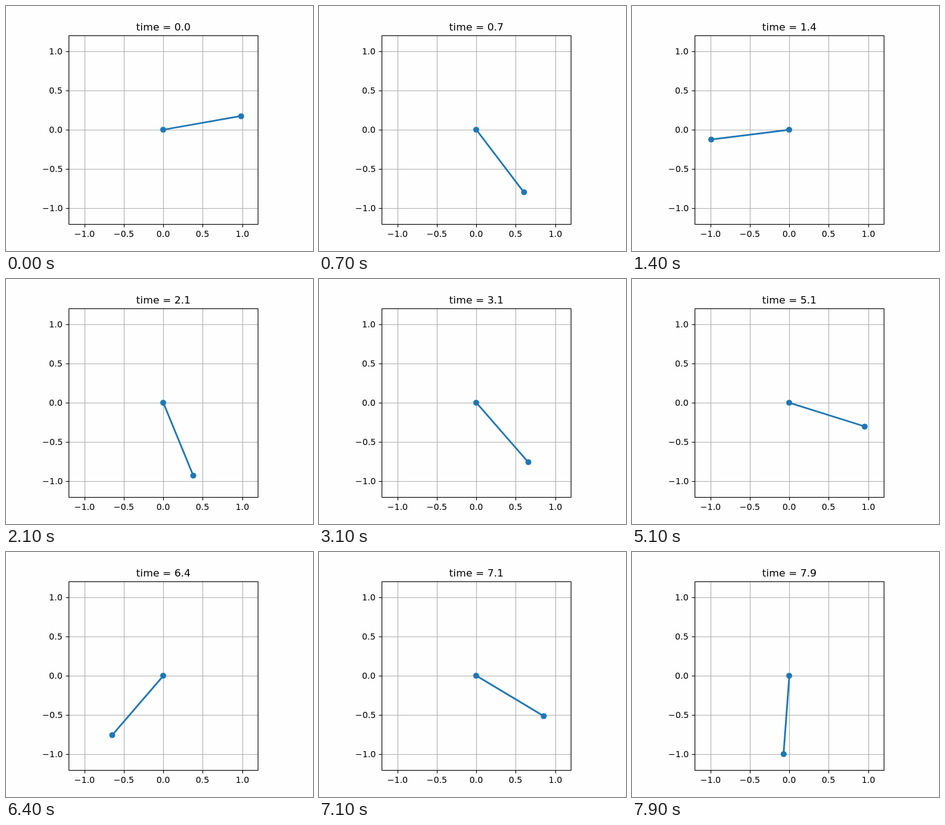
These frames come from a looping animation (500x400 px, 8000 ms). An HTML page with a canvas:

```html
<!DOCTYPE html>
<html lang="en">
<head>
<meta charset="utf-8">
<title>Pendulum</title>
<style>
  html, body { margin: 0; width: 100%; height: 100%; overflow: hidden; background: #fefefe; }
  canvas { display: block; width: 500px; height: 400px; }
</style>
</head>
<body>
<canvas id="stage" width="500" height="400"></canvas>
<script>
const ctx = document.getElementById('stage').getContext('2d');
const LOOP = 8000, STEP = 100;
const CX = 256.25, CY = 202, SCALE = 308 / 2.4;
const LEFT = 102.5, RIGHT = 410.5, TOP = 48.5, BOTTOM = 356.5;
const PT = 100 / 72;
const BLUE = '#1f77b4';
const TICKS = [-1, -0.5, 0, 0.5, 1];

// Turning points of the swing: [seconds, degrees from straight down]
const TURNS = [
  [0.152, 105.2], [1.425, -83], [2.644, 90], [3.812, -68.5],
  [4.978, 75.7], [6.133, -56.9], [7.247, 63.7], [8.378, -46.7]
];

// Large-amplitude swing: a cosine flattened at the ends, leaning to the right
function angleAt(t) {
  let i = 0;
  while (i < TURNS.length - 2 && t >= TURNS[i + 1][0]) i++;
  const [t0, a] = TURNS[i], [t1, b] = TURNS[i + 1];
  const phase = Math.PI * (t - t0) / (t1 - t0);
  const mid = (a + b) / 2, half = (a - b) / 2;
  const flat = 0.0065 * (half * Math.PI / 180) ** 2;
  const lean = 4.5 * Math.abs(half / 94) ** 3;
  const wave = (1 + flat) * Math.cos(phase) - flat * Math.cos(3 * phase);
  return (mid + half * wave + lean * Math.sin(phase) ** 2) * Math.PI / 180;
}

const toX = v => CX + v * SCALE;
const toY = v => CY - v * SCALE;
const snap = v => Math.floor(v + 0.5) + 0.5;

function line(x0, y0, x1, y1, color, width) {
  ctx.strokeStyle = color;
  ctx.lineWidth = width;
  ctx.beginPath();
  ctx.moveTo(x0, y0);
  ctx.lineTo(x1, y1);
  ctx.stroke();
}

function text(str, x, y, pt, align) {
  ctx.font = `${pt * PT}px "DejaVu Sans", sans-serif`;
  ctx.fillStyle = '#000';
  const w = ctx.measureText(str).width;
  ctx.fillText(str, Math.round(x - w * align), y);
}

function dot(x, y) {
  ctx.fillStyle = BLUE;
  ctx.beginPath();
  ctx.arc(Math.round(x), Math.round(y), 3.5 * PT, 0, 2 * Math.PI);
  ctx.fill();
}

function drawAxes() {
  const thin = 0.8 * PT;
  ctx.lineCap = 'butt';
  for (const v of TICKS) {
    const x = snap(toX(v)), y = snap(toY(v));
    line(x, TOP, x, BOTTOM, '#b0b0b0', thin);
    line(LEFT, y, RIGHT, y, '#b0b0b0', thin);
  }
  for (const v of TICKS) {
    const x = snap(toX(v)), y = snap(toY(v));
    const label = v.toFixed(1).replace('-', '\u2212');
    line(x, BOTTOM, x, BOTTOM + 4.86, '#000', thin);
    line(LEFT, y, LEFT - 4.86, y, '#000', thin);
    text(label, toX(v), 377, 10, 0.5);
    text(label, 92.5, Math.floor(y) + 5, 10, 1);
  }
}

function drawFrame() {
  ctx.strokeStyle = '#000';
  ctx.lineWidth = 0.8 * PT;
  ctx.strokeRect(LEFT, TOP, RIGHT - LEFT, BOTTOM - TOP);
}

function draw(t) {
  ctx.fillStyle = '#fefefe';
  ctx.fillRect(0, 0, 500, 400);
  drawAxes();

  const angle = angleAt(t);
  const x = toX(Math.sin(angle)), y = toY(-Math.cos(angle));
  ctx.lineCap = 'square';
  line(CX, CY, x, y, BLUE, 2 * PT);
  dot(CX, CY);
  dot(x, y);

  drawFrame();
  text('time = ' + t.toFixed(1), CX, 40, 12, 0.5);
}

const start = performance.now();
function tick() {
  const ms = (performance.now() - start) % LOOP;
  draw(Math.floor(ms / STEP) * STEP / 1000);
  requestAnimationFrame(tick);
}
tick();
</script>
</body>
</html>
```
